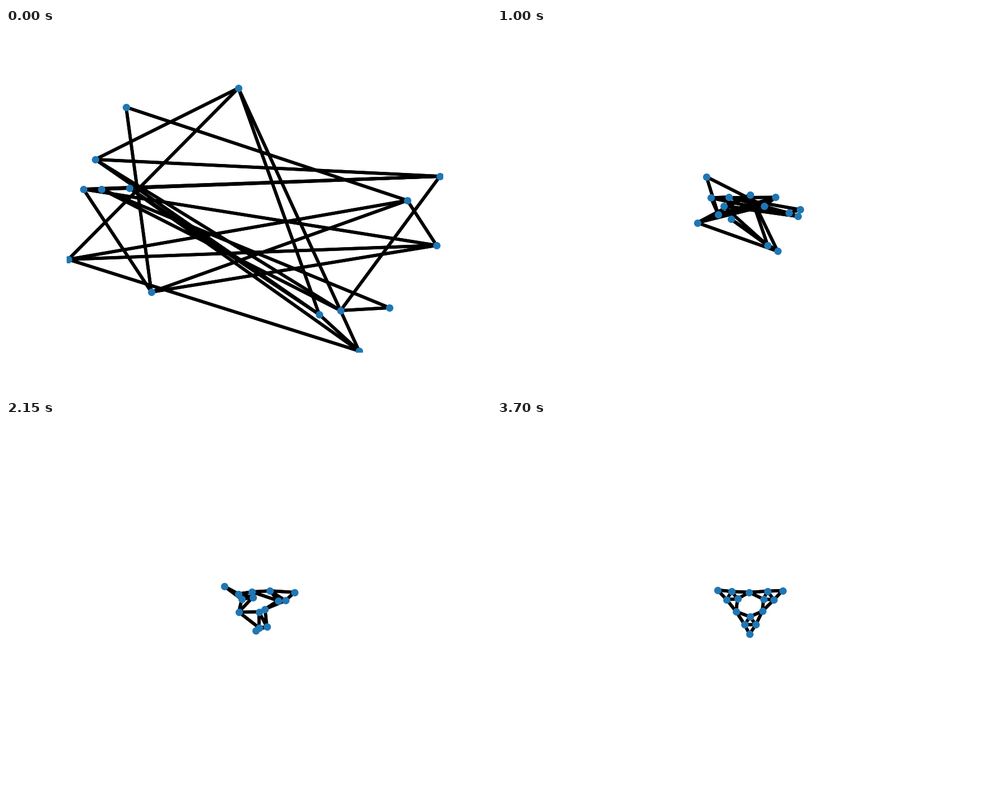
A matplotlib script that plays this animation: 864 by 648 pixels, repeating every 3750 ms.

```python
import numpy as np
import matplotlib.pyplot as plt
from matplotlib.animation import FuncAnimation
from matplotlib.collections import LineCollection

FRAMES, INTERVAL = 75, 50
W, H, DPI = 864, 648, 135
DECAY, KICK_RISE = 13.3, 2.0  # time constants in frames


def on_ellipse(degrees, rx, ry):
    a = np.radians(degrees)
    return np.array([450.5 + rx * np.cos(a), 329.5 + ry * np.sin(a)])


def mix(a, b, amount):
    return a + (b - a) * amount


# Settled shape: three small triangles joined into a big one
rest = {}
for name, angle in zip(("low", "left", "right"), (90, 210, 330)):
    rest[name] = on_ellipse(angle, 66.4, 52.5)
for name, angle in zip(("top", "east", "west"), (270, 30, 150)):
    rest[name] = on_ellipse(angle, 27, 22.7)

edges = []
for corner, a, b in (("left", "top", "west"),
                     ("right", "top", "east"),
                     ("low", "west", "east")):
    ca, cb, ab = f"{corner}-{a}", f"{corner}-{b}", f"{a}-{b}"
    rest[ca] = mix(rest[a], rest[corner], 0.56)
    rest[cb] = mix(rest[b], rest[corner], 0.56)
    rest[ab] = mix((rest[a] + rest[b]) / 2, rest[corner], 0.25)
    edges += [(corner, ca), (ca, a), (a, ab), (ab, b), (b, cb),
              (cb, corner), (ca, ab), (ab, cb), (cb, ca)]

# Scattered starting points
start = {
    "left": (214, 141), "right": (683, 498), "low": (220, 285),
    "top": (138, 287), "west": (111, 412), "east": (159, 234),
    "left-top": (259, 470), "left-west": (715, 307), "top-west": (767, 387),
    "right-top": (170, 287), "right-east": (596, 503), "top-east": (773, 264),
    "low-west": (629, 575), "low-east": (558, 510), "west-east": (414, 107),
}

# Early sideways push on the way in
kick = {
    "left": (90, -10), "right": (-30, -104), "low": (80, -90),
    "west": (0, -45), "left-top": (50, -45), "top-west": (-30, -146),
    "right-east": (20, -140), "top-east": (-20, 130),
    "low-west": (80, -60), "low-east": (0, -40), "west-east": (40, 0),
}

names = list(rest)
end_pos = np.array([rest[n] for n in names])
offset = np.array([start[n] for n in names]) - end_pos
push = np.array([kick.get(n, (0, 0)) for n in names])

# Each edge is stroked once from either end
links = np.array([(names.index(a), names.index(b)) for a, b in edges])
links = np.vstack([links, links[:, ::-1]])

fig, ax = plt.subplots(figsize=(W / DPI, H / DPI), dpi=DPI, facecolor="white")
fig.subplots_adjust(left=0.125, right=0.9, bottom=0.11, top=0.88)
ax.set_xlim(0.125 * W, 0.9 * W)
ax.set_ylim(0.89 * H, 0.12 * H)
ax.axis("off")

lines = LineCollection([], colors="black", linewidths=3, zorder=1)
ax.add_collection(lines, autolim=False)
dots, = ax.plot([], [], "o", color="#1f77b4", markersize=6, zorder=2)


def draw(i):
    swing = push * (1 - np.exp(-i / KICK_RISE))
    pos = end_pos + (offset + swing) * np.exp(-i / DECAY)
    lines.set_segments(pos[links])
    dots.set_data(pos[:, 0], pos[:, 1])
    return lines, dots


anim = FuncAnimation(fig, draw, frames=FRAMES, interval=INTERVAL,
                     repeat=True, repeat_delay=0)
plt.show()
```
